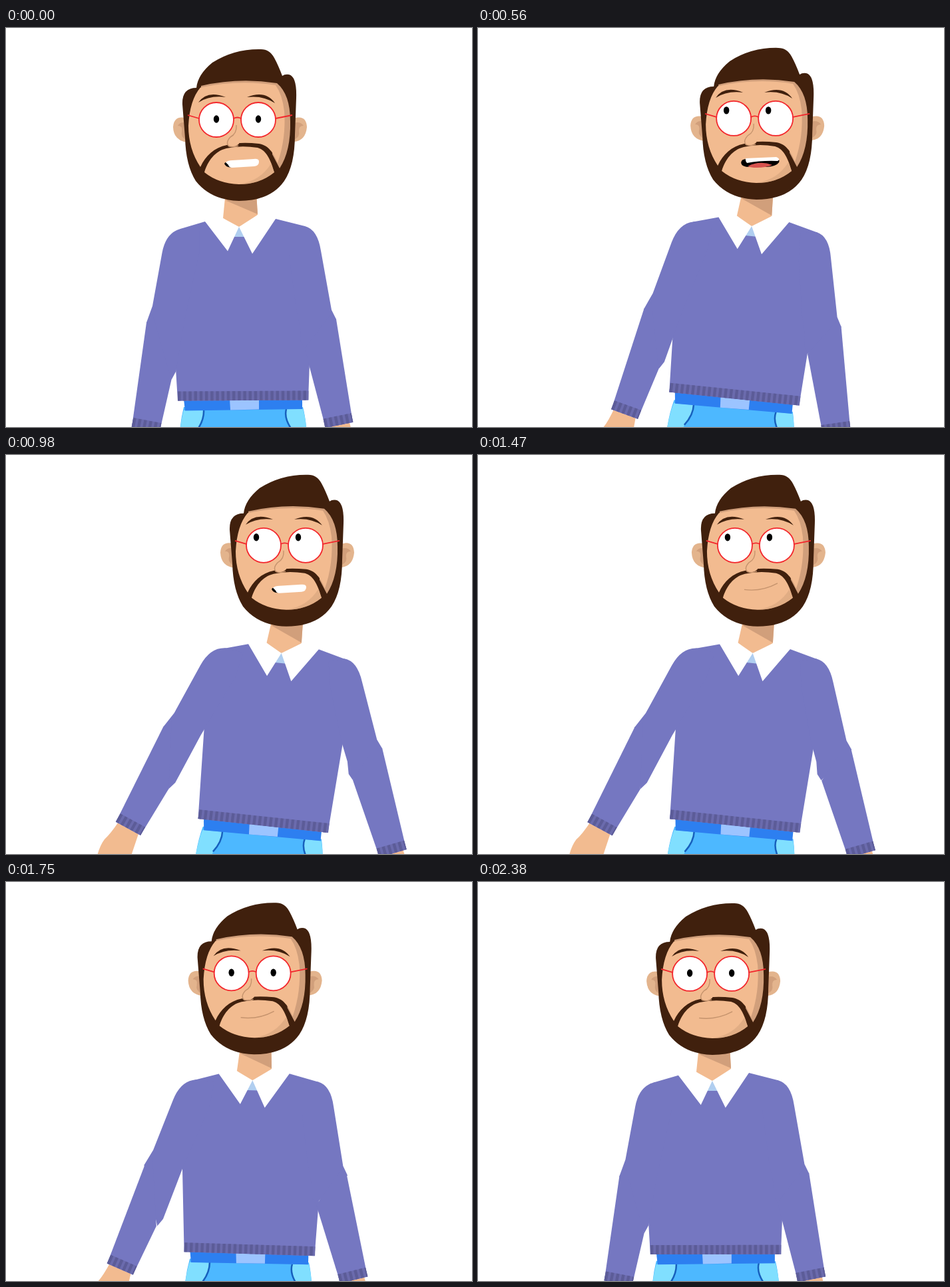
Write an HTML page that moves like this. It is 700 by 600 pixels and loops after 3.08 s.

```html
<!DOCTYPE html>
<html lang="en">
<head>
<meta charset="utf-8">
<title>Man in a sweater</title>
<style>
  html, body { margin: 0; width: 100%; height: 100%; overflow: hidden; background: #fff; }
  svg { display: block; width: 100vw; height: 100vh; }
  .sweater { fill: #7577c1; }
  .rib { fill: none; stroke: #6b6bad; stroke-width: 14; }
  .rib.dark { stroke: #5c5c98; stroke-dasharray: 4.4 3.8; }
  .skin { fill: #f2bb90; }
  .shade { fill: #d19f7b; }
  .hair { fill: #40200d; }
  .ear { fill: #e3b48d; }
  .frame { fill: none; stroke: #f3262c; stroke-width: 1.8; }
  .crease { fill: none; stroke: #c5936d; stroke-width: 1.4; }
</style>
</head>
<body>
<svg viewBox="0 0 700 600">
  <g id="pants">
    <path fill="#4db8ff" d="M267 570H446Q450 585 452 610V640H261V610Q262 590 267 570Z"/>
    <path fill="#80dfff" d="M267 575H297Q298 590 286 606L280 640H261V610Q263 588 267 575ZM420 573Q417 588 431 606L436 640H452V610Q450 585 446 573Z"/>
    <path fill="none" stroke="#1760bd" stroke-width="2.5" d="M297 574Q298 590 286 606M421 573Q417 588 431 606"/>
    <path fill="#2d7ff0" d="M267 558L445 556V573L269 575.5Z"/>
    <path fill="#9cc4ff" d="M336 557H380V573.5L337 574.5Z"/>
  </g>

  <g id="torso">
    <path class="skin" d="M330 245L326 286L350 302L378 281L376 245Z"/>
    <path class="shade" d="M329 259L376 250L378 280Z"/>
    <path class="sweater" d="M299 291L262 302L252 330L248 400L258 560.5L454 559.5L459 420L460 330L449 298L405 287L358 313H342Z"/>
    <path class="rib" d="M258 553.5L454.5 552.5"/>
    <path class="rib dark" d="M258 553.5L454.5 552.5"/>
    <path fill="#b0cef0" d="M350 298L342 314H359Z"/>
    <path fill="#fff" d="M299 291L326 286L350 299L333 335.5ZM405 287L378 281L350 299L370 339.5Z"/>

    <g id="leftArm">
      <path class="sweater" d="M290 300L262 302Q240 308 234.5 338L220 418L211 443L248.5 529L255 517L268.5 438L290 340Z"/>
      <g id="leftForearm">
        <path class="skin" d="M193 598Q187 620 181 630Q176 645 180 670H227V606Z"/>
        <path class="sweater" d="M220 430L211 443L189 600L230.5 608L248.5 529Z"/>
        <path class="rib" d="M190 593L232 601"/>
        <path class="rib dark" d="M190 593L232 601"/>
      </g>
    </g>

    <g id="rightArm">
      <path class="sweater" d="M425 300L449 298Q468 303 473 335L489 424L496 438L448.5 481.5L443 472L442.5 453L436 423L425 340Z"/>
      <g id="rightForearm">
        <path class="skin" d="M488 599L516 593Q523 620 525 670H486Z"/>
        <path class="sweater" d="M488 430L496 438L521 593L480 601L448.5 481.5Z"/>
        <path class="rib" d="M478 594.5L520 586"/>
        <path class="rib dark" d="M478 594.5L520 586"/>
      </g>
    </g>
  </g>

  <g id="head">
    <path class="ear" d="M273 136Q252 130 251 149Q252 170 273 172ZM432 136Q451 130 452 149Q450 170 432 171Z"/>
    <path class="shade" d="M272 143Q262 140 258 147Q266 147 264 156Q262 163 270 168ZM433 143Q442 140 447 147Q439 147 440 156Q442 163 433 168Z"/>
    <path class="hair" d="M286 90Q288 70 310 52Q343 31 383 32Q396 32 403 45Q409 56 415 72Q419 69 425 70Q437 73 436 105L434 160Q434 206 418 230Q397 260 350 260Q308 259 285 230Q270 206 269 165L265 115Q264 90 286 90Z"/>
    <path class="shade" d="M293 87Q350 74 407 83Q427 100 427 140Q428 185 411 211L400 190V95H293Z"/>
    <path class="skin" d="M292 89.5Q350 77 405 86Q415 100 418 125Q421 165 408 203C402 188 394 176 380 174Q350 171 332 176C312 180 300 192 292 209Q274 182 274 147Q276 108 292 89.5Z"/>
    <path class="skin" d="M298 217C303 200 314 185 331 181Q352 176 378 180C392 184 398 200 403 217Q381 235 350 235Q319 234 298 217Z"/>
    <path class="shade" d="M403 217Q381 235 350 235Q382 230 398 204Z" opacity=".5"/>
    <path class="skin" d="M345 148Q346 160 336 165Q329 174 336 178Q344 180 350 174L354 150Z"/>
    <path class="crease" d="M346 146Q347 159 337 164Q329 173 335 178Q342 180 349 177"/>
    <path class="hair" id="brows" d="M289 112Q302 93 330 104Q306 101 289 112ZM362 104Q390 93 404 113Q386 101 362 104Z"/>
    <g class="frame">
      <circle cx="316" cy="138" r="26" fill="#fff"/>
      <circle cx="379" cy="138" r="26" fill="#fff"/>
      <path d="M342 136Q347.5 133 353 136M290 136L273 131M405 136L430 131"/>
    </g>
    <g id="pupils">
      <ellipse cx="316" cy="137" rx="4.2" ry="5.7"/>
      <ellipse cx="379" cy="137" rx="4.2" ry="5.7"/>
    </g>
    <g id="teeth">
      <path d="M328 204Q329 201 334 202L340 209Q331 211 328 204Z"/>
      <path fill="#fff" d="M330 202Q333 199 340 199L372 197Q380 196 380 201Q380 207 373 208L340 210Q335 210 334 206Z"/>
    </g>
    <g id="open">
      <path d="M327 205Q327 199 335 199L378 198Q386 198 384 204Q380 210 365 211H340Q328 211 327 205Z"/>
      <path fill="#d6524e" d="M337 210Q355 201 374 208Q365 212 350 212Q342 212 337 210Z"/>
      <path fill="#fff" d="M334 198L380 196Q387 199 382 202Q358 201 336 205Q333 202 334 198Z"/>
    </g>
    <path id="closed" class="crease" d="M330 204.5Q356 208 380 195"/>
  </g>
</svg>
<script>
  const LOOP = 3080, STEP = 70, LAST = 2380;
  const part = id => document.getElementById(id);
  const move = (id, transform) => part(id).setAttribute('transform', transform);
  const show = (id, on) => part(id).setAttribute('visibility', on ? 'visible' : 'hidden');

  const sigmoid = (t, mid, width) => 1 / (1 + Math.exp((mid - t) / width));
  const smooth = (t, from, to) => {
    const x = Math.min(1, Math.max(0, (t - from) / (to - from)));
    return x * x * (3 - 2 * x);
  };

  // The forearm follows the upper arm with a slight lag on the way down.
  function moveArm(side, shoulder, elbow, upper, lower) {
    move(side + 'Arm', `rotate(${upper} ${shoulder})`);
    move(side + 'Forearm', `rotate(${lower - upper} ${elbow})`);
  }

  function pose(t) {
    const lean = sigmoid(t, 418, 44.7) - 0.97 * sigmoid(t, 1702, 56);
    const lookBack = smooth(t, 1500, 1720);
    const look = smooth(t, 140, 320) - lookBack;
    const brow = smooth(t, 350, 540) - lookBack;
    const raise = smooth(t, 420, 840);
    const swing = (angle, from, to) => angle * (raise - smooth(t, from, to));

    move('pants', `translate(${28.5 * lean} ${-2 * lean}) rotate(${6 * lean} 356 568)`);
    move('torso', `translate(${356 + 30 * lean} ${560 - 2.5 * lean}) rotate(${6.4 * lean}) skewX(${-lean}) translate(-356 -560)`);
    moveArm('left', '270 320', '232 478', swing(11.2, 1500, 2380), swing(11.2, 1640, 2380));
    moveArm('right', '441 318', '472 460', swing(-11.5, 1350, 1850), swing(-11.5, 1430, 2000));
    move('head', `translate(${71 * lean} ${-2.2 * lean})`);
    move('brows', `translate(0 ${-5 * brow})`);
    move('pupils', `translate(${-11 * look} ${-11 * look})`);

    const mouth = t >= 1190 ? 'closed' : t >= 420 && t < 700 ? 'open' : 'teeth';
    for (const id of ['teeth', 'open', 'closed']) show(id, id === mouth);
  }

  function tick() {
    const t = performance.now() % LOOP;
    pose(Math.min(LAST, Math.floor(t / STEP) * STEP));
    requestAnimationFrame(tick);
  }
  tick();
</script>
</body>
</html>
```
